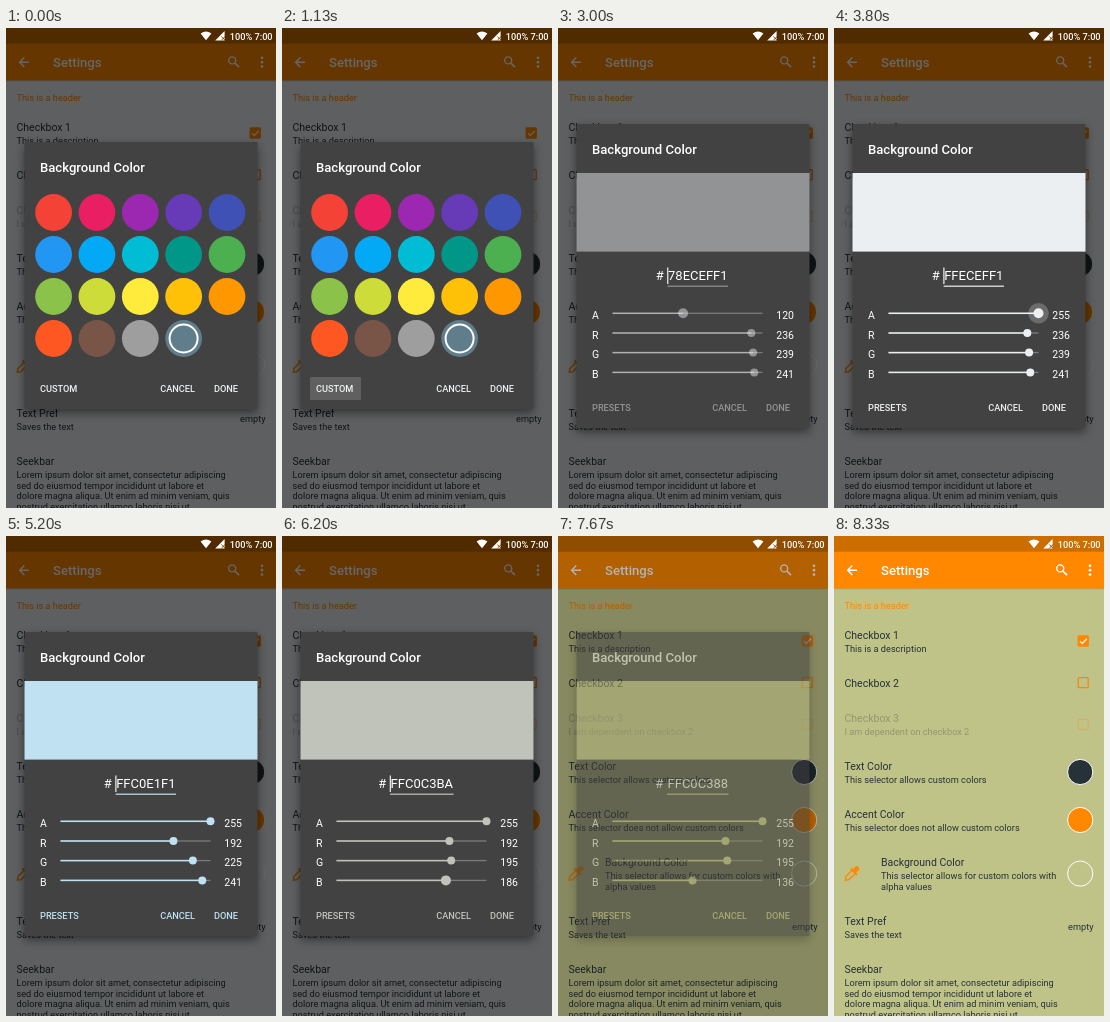
Write an HTML page that moves like this. It is 270 by 480 pixels and loops after 9070 ms.

```html
<!DOCTYPE html>
<html lang="en">
<head>
<meta charset="utf-8">
<title>Background color picker</title>
<style>
  html, body { margin: 0; width: 100%; height: 100%; overflow: hidden; background: #000; }
  svg { display: block; width: 100vw; height: 100vh; font-family: Roboto, "Noto Sans", sans-serif; }
  .head { font-size: 13.1px; font-weight: 500; }
  .item { font-size: 10.5px; }
  .note { font-size: 9.2px; }
  .btn { font-size: 9.2px; font-weight: 500; }
  .hex { font-size: 13px; }
  .sheet { fill: #424242; filter: drop-shadow(0 4px 5px rgba(0, 0, 0, .45)); }
</style>
</head>
<body>
<svg id="stage" viewBox="0 0 270 480" preserveAspectRatio="none"></svg>
<script>
const LOOP = 9070, FPS = 15;
const ORANGE = '#ff8800', INK = '#263238', PALE = '#eceff1', OLIVE = '#c0c388';
const SWAP = 1200, SAVED = 7460, CLOSE = 7530, CLOSED = 7800;

const PRESETS = ('f44336 e91e63 9c27b0 673ab7 3f51b5 2196f3 03a9f4 00bcd4 009688 4caf50 ' +
  '8bc34a cddc39 ffeb3b ffc107 ff9800 ff5722 795548 9e9e9e 607d8b').split(' ');

// Each channel: row position, value keys [ms, value], time held
const CHANNELS = [
  { name: 'A', y: 285.3, keys: [[2400, 255], [2600, 235], [3070, 100], [3600, 255]], held: [2400, 4070] },
  { name: 'R', y: 305, keys: [[4330, 236], [4730, 192]], held: [4330, 4800] },
  { name: 'G', y: 324.6, keys: [[5070, 239], [5200, 225], [5600, 195]], held: [5260, 5670] },
  { name: 'B', y: 344.4, keys: [[5870, 241], [6200, 186], [6700, 136]], held: [5870, 6930] }
];
const TRACK_X = 54.5, TRACK_W = 150;

const stage = document.getElementById('stage');
const clamp = (v, lo = 0, hi = 1) => Math.min(hi, Math.max(lo, v));

function set(node, attrs) {
  for (const k in attrs) node.setAttribute(k, attrs[k]);
}
function add(parent, tag, attrs = {}, content) {
  const node = document.createElementNS('http://www.w3.org/2000/svg', tag);
  set(node, attrs);
  if (content !== undefined) node.textContent = content;
  parent.appendChild(node);
  return node;
}
const group = (parent, attrs) => add(parent, 'g', attrs);
const rect = (parent, x, y, width, height, attrs) => add(parent, 'rect', { x, y, width, height, ...attrs });
const circle = (parent, cx, cy, r, attrs) => add(parent, 'circle', { cx, cy, r, ...attrs });
const path = (parent, d, attrs) => add(parent, 'path', { d, ...attrs });
const label = (parent, kind, x, y, content, attrs) =>
  add(parent, 'text', { class: kind, x, y, ...attrs }, content);

// Settings page
const page = group(stage, { fill: INK });
const backdrop = rect(page, 0, 0, 270, 480);
rect(page, 0, 0, 270, 16, { fill: '#cc6d00' });
const bar = group(page, { fill: '#fff' });
rect(bar, 0, 15.7, 270, 36.8, { fill: ORANGE });
rect(page, 0, 52.5, 270, 1, { fill: '#000', opacity: .12 });
path(bar, 'M23 34.2H13.7M18.3 29.5L13.6 34.2L18.3 38.9', { fill: 'none', stroke: '#fff', 'stroke-width': 1.4 });
label(bar, 'head', 47, 39, 'Settings');
circle(bar, 226.2, 32.4, 3.5, { fill: 'none', stroke: '#fff', 'stroke-width': 1.4 });
path(bar, 'M228.8 35L233 39.2', { stroke: '#fff', 'stroke-width': 1.7 });
[29.8, 34.2, 38.6].forEach(y => circle(bar, 256, y, 1.35));

label(page, 'note', 10.5, 73.3, 'This is a header', { fill: ORANGE });

function entry(x, y, title, notes, attrs = {}) {
  const g = group(page, attrs);
  label(g, 'item', x, y, title);
  notes.forEach((line, i) => label(g, 'note', x, y + 13 + i * 10.7, line));
  return g;
}
function box(parent, y) {
  rect(parent, 244.2, y - 5, 10, 10, { rx: .8, fill: 'none', stroke: ORANGE, 'stroke-width': 1.3 });
}
const first = entry(10.5, 103, 'Checkbox 1', ['This is a description']);
box(first, 105);
rect(first, 244, 100, 10.4, 10, { fill: ORANGE });
path(first, 'M246 105.2L248.3 107.5L252.8 102.8', { fill: 'none', stroke: PALE, 'stroke-width': 1.3 });
box(entry(10.5, 150.7, 'Checkbox 2', []), 146.7);
box(entry(10.5, 186.4, 'Checkbox 3', ['I am dependent on checkbox 2'], { opacity: .3 }), 188.3);
entry(10.5, 234, 'Text Color', ['This selector allows custom colors']);
entry(10.5, 282, 'Accent Color', ['This selector does not allow custom colors']);
entry(47, 330, 'Background Color', ['This selector allows for custom colors with', 'alpha values']);
entry(10.5, 388.8, 'Text Pref', ['Saves the text']);
entry(10.5, 437, 'Seekbar', [
  'Lorem ipsum dolor sit amet, consectetur adipiscing',
  'sed do eiusmod tempor incididunt ut labore et',
  'dolore magna aliqua. Ut enim ad minim veniam, quis',
  'nostrud exercitation ullamco laboris nisi ut'
]);
label(page, 'note', 259.5, 394.3, 'empty', { 'text-anchor': 'end' });

const swatch = (y, fill) => circle(page, 246.2, y, 12.6, { fill, stroke: '#fff', 'stroke-width': 1 });
swatch(236, INK);
swatch(284, ORANGE);
const savedSwatch = swatch(337.6, PALE);

const dropper = group(page, { transform: 'translate(17.7 337.8) rotate(45)', fill: ORANGE });
rect(dropper, -2.4, -9.8, 4.8, 6.5, { rx: 2 });
rect(dropper, -4.4, -4, 8.8, 2);
path(dropper, 'M-2.2 -2V6L0 9L2.2 6V-2', { fill: 'none', stroke: ORANGE, 'stroke-width': 1.4 });

const dim = rect(stage, 0, 0, 270, 480, { fill: '#000' });

// Status icons stay bright above the dimming
const status = group(stage, { fill: '#fff' });
path(status, 'M194.6 5.6Q200 1.2 205.4 5.6L200 12.3Z');
path(status, 'M218.6 3V12.4H209.2Z');
path(status, 'M215.4 8.6L219 12.2M219 8.6L215.4 12.2', { stroke: '#8a4a00', 'stroke-width': 1 });
label(status, 'btn', 223.8, 11.8, '100%');
label(status, 'btn', 266.6, 11.8, '7:00', { 'text-anchor': 'end' });

// Dialog
const dialog = group(stage, { fill: '#fff' });
function sheet(top, bottom, toggle) {
  const g = group(dialog);
  rect(g, 18.5, top, 233, bottom - top, { rx: 1.3, class: 'sheet' });
  label(g, 'head', 34, top + 29.6, 'Background Color');
  const buttons = group(g, { fill: PALE });
  label(buttons, 'btn', 34, bottom - 17.2, toggle);
  label(buttons, 'btn', 189, bottom - 17.2, 'CANCEL', { 'text-anchor': 'end' });
  label(buttons, 'btn', 232, bottom - 17.2, 'DONE', { 'text-anchor': 'end' });
  return { g, buttons };
}

const presets = sheet(114, 381, 'CUSTOM');
PRESETS.forEach((hex, i) =>
  circle(presets.g, 47.6 + i % 5 * 43.35, 184.5 + Math.floor(i / 5) * 42, 18.4, { fill: '#' + hex }));
circle(presets.g, 177.6, 310.5, 14, { fill: 'none', stroke: '#fff', 'stroke-width': 2 });
const ripple = rect(presets.g, 28, 349, 51, 23, { rx: 1.3, opacity: 0 });

const custom = sheet(96, 400, 'PRESETS');
const preview = rect(custom.g, 18.5, 145, 233, 78.6);
const hash = label(custom.g, 'hex', 0, 252, '#');
const code = label(custom.g, 'hex', 139.8, 252, '', { 'text-anchor': 'middle' });
const underline = rect(custom.g, 0, 257.6, 0, 1.2);
const cursor = rect(custom.g, 0, 239.5, 1.1, 16.5);

for (const c of CHANNELS) {
  const g = group(custom.g);
  label(g, 'item', 34, c.y + 5.6, c.name);
  c.text = label(g, 'item', 236, c.y + 5.6, '', { 'text-anchor': 'end' });
  rect(g, TRACK_X, c.y - .65, TRACK_W, 1.3, { opacity: .3 });
  c.fill = rect(g, TRACK_X, c.y - .75, 0, 1.5);
  c.halo = circle(g, 0, c.y, 10.3, { opacity: 0 });
  c.thumb = circle(g, 0, c.y, 4);
}

function valueAt(keys, t) {
  let [t0, v0] = keys[0];
  for (const [t1, v1] of keys) {
    if (t < t1) return t <= t0 ? v0 : Math.round(v0 + (v1 - v0) * (t - t0) / (t1 - t0));
    [t0, v0] = [t1, v1];
  }
  return v0;
}

// The caret blinks at rest and stays on while the value is edited
function caretOn(t) {
  if (t < 2400) return (t - SWAP) % 1000 < 500;
  return t < 7300;
}

function drawPicker(t) {
  const values = CHANNELS.map(c => valueAt(c.keys, t));
  const [a, r, g, b] = values;
  const tint = `rgba(${r}, ${g}, ${b}, ${a / 255})`;
  set(preview, { fill: tint });
  set(custom.buttons, { fill: tint });

  code.textContent = values.map(v => v.toString(16).padStart(2, '0')).join('').toUpperCase();
  const width = code.getComputedTextLength();
  const left = 139.8 - width / 2;
  set(hash, { x: left - 12.4 });
  set(underline, { x: left - .5, width: width + 1, fill: tint });
  set(cursor, { x: left - .8, opacity: caretOn(t) ? 1 : 0 });

  CHANNELS.forEach((c, i) => {
    const w = values[i] / 255 * TRACK_W;
    const held = t >= c.held[0] && t < c.held[1];
    c.text.textContent = values[i];
    set(c.fill, { width: w, fill: tint });
    set(c.thumb, { cx: TRACK_X + w, r: held ? 5 : 4, fill: tint });
    set(c.halo, { cx: TRACK_X + w });
  });
  const glow = clamp((t - 3600) / 130) * clamp((4130 - t) / 150);
  set(CHANNELS[0].halo, { opacity: .22 * glow });
}

function draw(t) {
  const shown = 1 - clamp((t - CLOSE) / (CLOSED - CLOSE));
  set(backdrop, { fill: t < CLOSE - 5 ? PALE : OLIVE });
  set(savedSwatch, { fill: t < SAVED ? PALE : OLIVE });
  set(dim, { opacity: .6 * shown });
  set(dialog, { opacity: shown });

  const isCustom = t >= SWAP - 5;
  set(presets.g, { display: isCustom ? 'none' : 'inline' });
  set(custom.g, { display: isCustom ? 'inline' : 'none' });
  set(ripple, { opacity: .16 * clamp((t - 940) / 150) });
  if (isCustom) drawPicker(t);
}

const start = performance.now();
function tick() {
  const t = (performance.now() - start) % LOOP;
  draw(Math.floor(t * FPS / 1000 + .06) * 1000 / FPS);
  requestAnimationFrame(tick);
}
tick();
</script>
</body>
</html>
```
